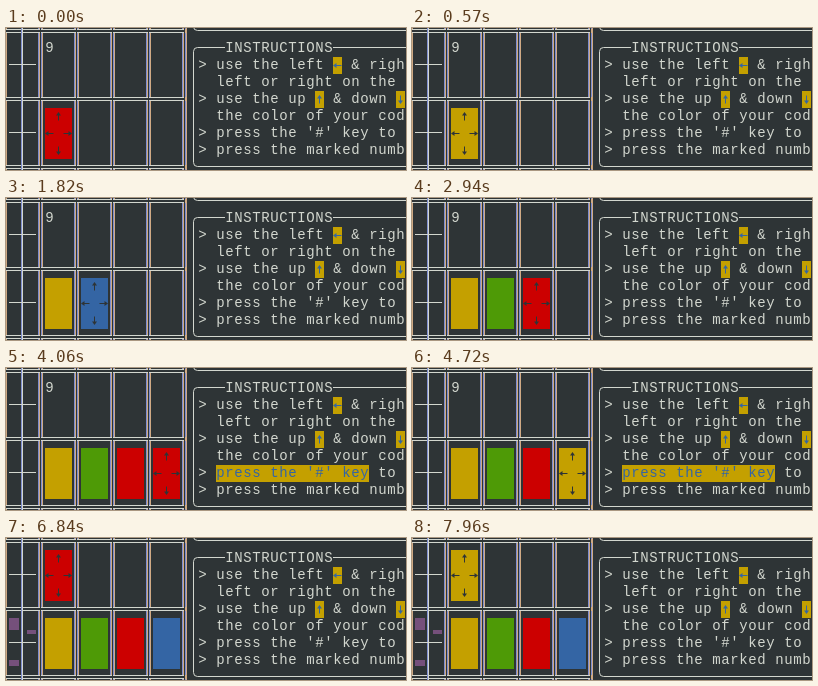
Animation of 400x142 px, one loop 8000 ms. Source, as an HTML page with a canvas:

```html
<!DOCTYPE html>
<html lang="en">
<head>
<meta charset="utf-8">
<title>Code breaker</title>
<style>
html, body { margin: 0; width: 100%; height: 100%; overflow: hidden; background: #2e3436; }
canvas { display: block; }
</style>
</head>
<body>
<canvas id="stage" width="400" height="142"></canvas>
<script>
const ctx = document.getElementById('stage').getContext('2d', { alpha: false });
const LOOP = 8000, CW = 9, CH = 17, LEFT = 3, TOP = 12;
const BG = '#2e3436', FG = '#d3d7cf';
const RED = '#cc0000', YELLOW = '#c4a000', BLUE = '#3465a4', GREEN = '#4e9a06', PURPLE = '#75507b';
// Fringes of the subpixel-smoothed upright lines
const COOL = '#7f8fd0', WARM = '#d0aa84';

// Each peg hole: grid position and its [time, colour] steps; arrows show until `done`.
const pegs = [
  { col: 4, row: 4, done: 1030, steps: [[0, RED], [500, YELLOW]] },
  { col: 8, row: 4, done: 2940, steps: [[1030, RED], [1490, YELLOW], [1820, BLUE], [2280, GREEN]] },
  { col: 12, row: 4, done: 4060, steps: [[2940, RED]] },
  { col: 16, row: 4, done: 6840, steps: [[4060, RED], [4720, YELLOW], [5450, BLUE]] },
  { col: 4, row: 0, done: LOOP, steps: [[6840, RED], [7960, YELLOW]] }
];

const cellX = col => LEFT + col * CW;
const cellY = row => TOP + row * CH;

function rect(x, y, w, h, color) {
  ctx.fillStyle = color;
  ctx.fillRect(x, y, w, h);
}

function put(col, row, text, color = FG, bg) {
  if (bg) rect(cellX(col), cellY(row), text.length * CW, CH, bg);
  ctx.fillStyle = color;
  [...text].forEach((ch, i) => ctx.fillText(ch, cellX(col + i) + CW / 2, cellY(row) + 12));
}

// Arrow with a solid head, centred in its cell
function arrow(col, row, angle, color, bg) {
  if (bg) rect(cellX(col), cellY(row), CW, CH, bg);
  ctx.save();
  ctx.translate(cellX(col) + 4.5, cellY(row) + 8.5);
  ctx.rotate(angle * Math.PI / 180);
  rect(-4, -0.5, 6, 1, color);
  ctx.beginPath();
  ctx.moveTo(4.5, 0);
  ctx.lineTo(1, -2.5);
  ctx.lineTo(1, 2.5);
  ctx.fill();
  ctx.restore();
}

function upright(x, y, h) {
  rect(x, y, 1, h, COOL);
  rect(x + 1, y, 1, h, WARM);
}

function drawBoard() {
  const walls = [-1, 3, 7, 11, 15, 19].map(cellX);
  const floors = [-1, 3, 7].map(cellY);
  for (const x of walls) {
    upright(x + 2, 0, 142);
    upright(x + 5, 0, 142);
  }
  for (const y of floors) {
    rect(0, y + 6, 181, 1, FG);
    rect(0, y + 9, 181, 1, FG);
    // Hollow crossings
    for (const x of walls) {
      rect(x + 2, y + 7, 5, 2, BG);
      rect(x + 4, y + 6, 1, 4, BG);
    }
    rect(cellX(19) + 5, y + 6, 2, 4, WARM);
  }
  rect(15, 0, 1, 142, COOL);
  rect(16, 0, 1, 142, FG);
  for (const row of [1, 5]) rect(3, cellY(row) + 7, 27, 1, FG);
}

function drawPanel(t) {
  ctx.strokeStyle = FG;
  ctx.lineWidth = 1;
  ctx.beginPath();
  ctx.moveTo(187.5, -5);
  ctx.arcTo(187.5, 2.5, 196, 2.5, 4);
  ctx.lineTo(400, 2.5);
  ctx.moveTo(219, 19.5);
  ctx.arcTo(187.5, 19.5, 187.5, 30, 4);
  ctx.arcTo(187.5, 138.5, 200, 138.5, 4);
  ctx.lineTo(400, 138.5);
  ctx.moveTo(327, 19.5);
  ctx.lineTo(400, 19.5);
  ctx.stroke();

  put(24, 0, 'INSTRUCTIONS');
  put(21, 1, '> use the left   & right');
  put(23, 2, 'left or right on the board');
  put(21, 3, '> use the up   & down');
  put(23, 4, 'the color of your code');
  put(21, 5, "> press the '#' key to");
  put(21, 6, '> press the marked number');
  arrow(36, 1, 180, BLUE, YELLOW);
  arrow(34, 3, -90, BLUE, YELLOW);
  arrow(43, 3, 90, BLUE, YELLOW);
  if (t >= 4060 && t < 6840) put(23, 5, "press the '#' key", BLUE, YELLOW);
}

function drawPeg({ col, row, done, steps }, t) {
  const step = steps.filter(s => t >= s[0]).pop();
  if (!step) return;
  rect(cellX(col), cellY(row), 3 * CW, 3 * CH, step[1]);
  if (t >= done) return;
  arrow(col + 1, row, -90, BG);
  arrow(col, row + 1, 180, BG);
  arrow(col + 2, row + 1, 0, BG);
  arrow(col + 1, row + 2, 90, BG);
}

function drawScore() {
  rect(3, 80, 10, 12, PURPLE);
  rect(21, 92, 9, 4, PURPLE);
  rect(3, 122, 10, 6, PURPLE);
}

function draw(t) {
  rect(0, 0, 400, 142, BG);
  ctx.font = '14px "Courier New", "Liberation Mono", monospace';
  ctx.textAlign = 'center';
  drawBoard();
  drawPanel(t);
  if (t < 6840) put(4, 0, '9');
  else drawScore();
  pegs.forEach(peg => drawPeg(peg, t));
}

const start = performance.now();
function tick() {
  draw((performance.now() - start) % LOOP);
  requestAnimationFrame(tick);
}
tick();
</script>
</body>
</html>
```
